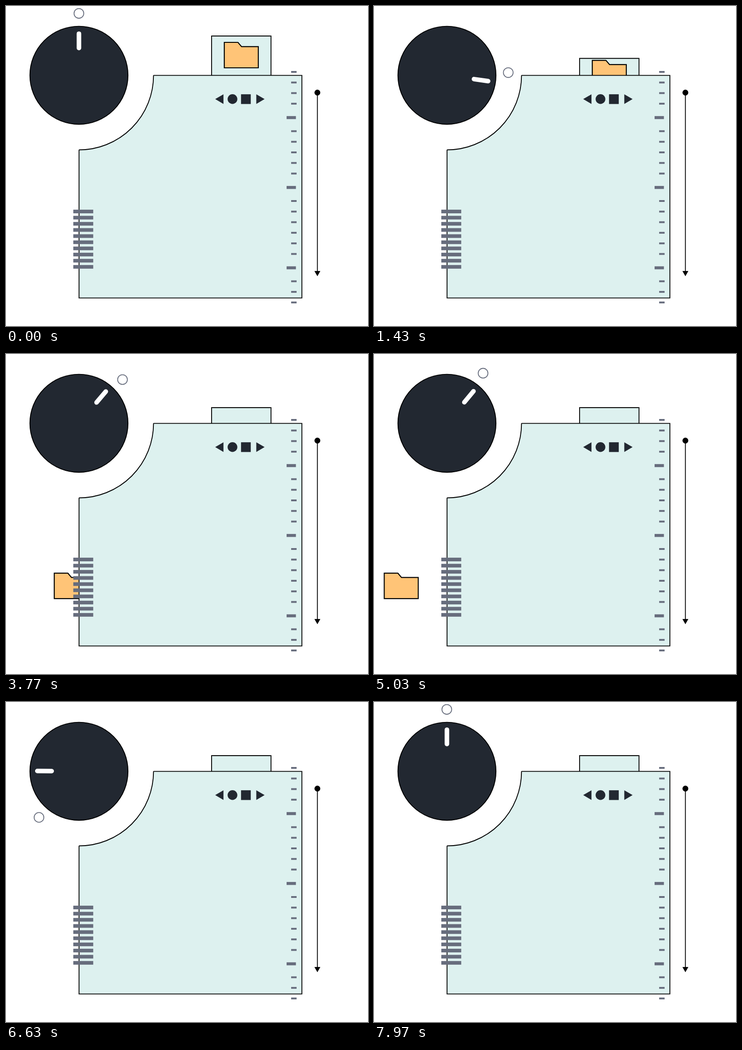
An HTML page with a canvas for the animation above (8 s loop, 796 px wide and 704 px high).

```html
<!DOCTYPE html>
<html lang="en">
<head>
<meta charset="utf-8">
<title>Dial and folder</title>
<style>
  html, body { margin: 0; width: 100%; height: 100%; overflow: hidden; background: #fff; }
  canvas { display: block; width: 796px; height: 704px; }
</style>
</head>
<body>
<canvas id="stage" width="796" height="704"></canvas>
<script>
const ctx = document.getElementById('stage').getContext('2d');
const LOOP = 8, FPS = 30, TAU = Math.PI * 2;
const MINT = '#ddf1ef', INK = '#222831', GREY = '#676d7d', ORANGE = '#ffc477';

// Easing
const sineInOut = u => (1 - Math.cos(Math.PI * u)) / 2;
const quadIn = u => u * u;

function bezier(x1, y1, x2, y2) {
  const at = (a, b, s) => 3 * a * s * (1 - s) ** 2 + 3 * b * s * s * (1 - s) + s ** 3;
  return u => {
    let lo = 0, hi = 1;
    for (let i = 0; i < 24; i++) {
      const mid = (lo + hi) / 2;
      if (at(x1, x2, mid) < u) lo = mid; else hi = mid;
    }
    return at(y1, y2, (lo + hi) / 2);
  };
}
const ease = bezier(0.25, 0.1, 0.25, 1);
const dialEase = bezier(0.5, 0.5, 0.55, 1);

function tween(t, start, length, from, to, fn) {
  const u = Math.min(1, Math.max(0, (t - start) / length));
  return u === 0 ? from : u === 1 ? to : from + (to - from) * fn(u);
}

// Dial and marker share three turns, in degrees
function turn(t, fn) {
  if (t < 3) return tween(t, 0, 2, 0, 108, fn);
  if (t < 5) return tween(t, 3, 1, 108, 36, fn);
  return tween(t, 5, 3, 36, 360, fn);
}

// Drawing helpers
function paint(fill, stroke, width) {
  if (fill) { ctx.fillStyle = fill; ctx.fill(); }
  if (stroke) { ctx.strokeStyle = stroke; ctx.lineWidth = width; ctx.stroke(); }
}

function poly(points, fill, stroke, width) {
  ctx.beginPath();
  points.forEach(([x, y]) => ctx.lineTo(x, y));
  ctx.closePath();
  paint(fill, stroke, width);
}

function disc(x, y, r, fill, stroke, width) {
  ctx.beginPath();
  ctx.arc(x, y, r, 0, TAU);
  paint(fill, stroke, width);
}

function box(x, y, w, h, fill) {
  ctx.fillStyle = fill;
  ctx.fillRect(x, y, w, h);
}

function drawFolder(x, y) {
  const shape = [[0, 0], [30, 0], [38, 9.4], [74.8, 9.4], [74.8, 56], [0, 56]];
  poly(shape.map(([dx, dy]) => [x + dx, y + dy]), ORANGE, '#000', 2.2);
}

function drawPanel(y) {
  poly([[452.1, y], [582.7, y], [582.7, y + 87], [452.1, y + 87]], MINT, '#000', 1.9);
}

function drawBody() {
  ctx.beginPath();
  ctx.moveTo(324.3, 152.6);
  ctx.lineTo(650.6, 152.6);
  ctx.lineTo(650.6, 642.4);
  ctx.lineTo(160.6, 642.4);
  ctx.lineTo(160.6, 316.5);
  ctx.arc(160.5, 152.6, 163.9, Math.PI / 2, 0, true);
  ctx.closePath();
  paint(MINT, '#000', 1.9);
}

function drawButtons() {
  poly([[460, 204.8], [478.2, 194.2], [478.2, 215.4]], INK);
  disc(498, 204.8, 10.7, INK);
  box(516.8, 194.2, 21.4, 21.4, INK);
  poly([[568.6, 204.8], [550.4, 194.2], [550.4, 215.4]], INK);
}

function ticks(y, count) {
  for (let i = 0; i < count; i++) box(627, y + i * 23.3 - 2, 12, 4, GREY);
}

function drawScale() {
  ticks(145, 4);
  ticks(275.4, 5);
  ticks(429, 6);
  ticks(605.6, 3);
  for (const y of [245.5, 399.2, 576]) box(617, y - 3.3, 20.5, 6.6, GREY);
}

function drawArrow() {
  box(683.8, 190.5, 1.8, 394, '#000');
  disc(684.7, 190.5, 6.4, '#000');
  poly([[678.2, 583], [691.2, 583], [684.7, 594.5]], '#000');
}

function drawVent() {
  for (let i = 0; i < 10; i++) box(148, 448.1 + i * 13.53, 43.8, 8, GREY);
}

function drawDial(deg) {
  ctx.save();
  ctx.translate(160.4, 152.4);
  disc(0, 0, 107.8, INK, '#000', 1.9);
  ctx.rotate(deg * TAU / 360);
  ctx.lineCap = 'round';
  ctx.beginPath();
  ctx.moveTo(0, -60);
  ctx.lineTo(0, -91.5);
  paint(null, '#fff', 10);
  ctx.restore();
}

function drawMarker(deg) {
  const a = deg * TAU / 360;
  disc(160.3 + 135 * Math.sin(a), 151.3 - 135 * Math.cos(a), 10.7, null, GREY, 1.8);
}

function folderPlace(t) {
  if (t < 2.5) return [480, tween(t, 0, 2, 80, 157, quadIn)];
  if (t < 5) return [tween(t, 3, 1.5, 470, 22.5, ease), 482.2];
  return [tween(t, 5.74, 1, 22.5, 470, ease), 482.2];
}

function draw(t) {
  box(0, 0, 796, 704, '#fff');
  drawPanel(tween(t, 0, 2, 66, 118, ease));
  drawFolder(...folderPlace(t));
  drawBody();
  drawButtons();
  drawScale();
  drawArrow();
  drawVent();
  drawDial(turn(t, dialEase));
  drawMarker(turn(t, sineInOut));
}

const begin = performance.now();
function tick(now) {
  const t = Math.max(0, now - begin) / 1000 % LOOP;
  draw(Math.min(LOOP * FPS - 1, Math.floor((t + 0.0034) * FPS)) / FPS);
  requestAnimationFrame(tick);
}
draw(0);
requestAnimationFrame(tick);
</script>
</body>
</html>
```
